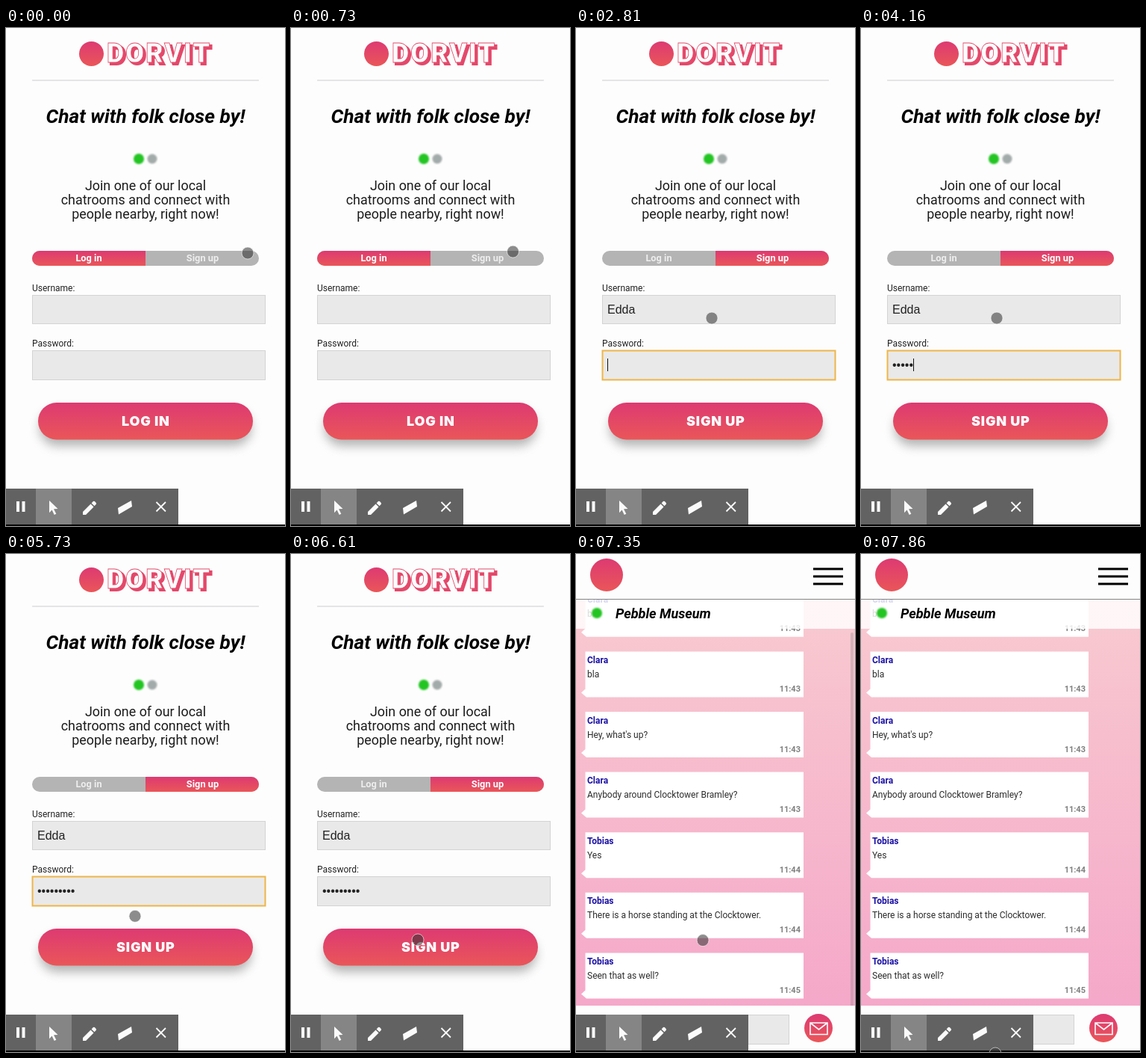
These frames come from a looping animation (374 px wide and 666 px high, 8000 ms). An HTML page:

```html
<!DOCTYPE html>
<html lang="en">
<head>
<meta charset="utf-8">
<title>Local chat</title>
<style>
html, body { margin: 0; height: 100%; overflow: hidden; background: #fdfdfd; }
svg { display: block; width: 100vw; height: 100vh; font-family: Roboto, sans-serif; }
.mid { text-anchor: middle; }
.title { font-weight: 700; font-style: italic; }
.logo { font-size: 36px; font-weight: 900; letter-spacing: 2px; }
.para { font-size: 17.9px; fill: #1c1c1c; }
.tab { font-size: 12.8px; font-weight: 700; }
.label { font-size: 12px; fill: #222; }
.typed { font: 16px "Liberation Sans", Arial, sans-serif; fill: #222; }
.button { font: 900 18px Inter, sans-serif; letter-spacing: .8px; fill: #fff; }
.field { fill: #e9e9e9; stroke: #d3d3d3; }
.name { font-size: 12px; font-weight: 700; fill: #1c12a4; }
.text { font-size: 12px; fill: #2c2c2c; }
.time { font-size: 11px; font-weight: 700; fill: #808080; text-anchor: end; }
</style>
</head>
<body>
<svg viewBox="0 0 374 666" preserveAspectRatio="none">
  <defs>
    <linearGradient id="red" x1="0" y1="0" x2="0" y2="1">
      <stop stop-color="#dd3a72"/><stop offset="1" stop-color="#ea5658"/>
    </linearGradient>
    <linearGradient id="sky" x1="0" y1="0" x2="0" y2="1">
      <stop stop-color="#f8cad0"/><stop offset="1" stop-color="#f5a8c9"/>
    </linearGradient>
    <filter id="soft"><feGaussianBlur stdDeviation="1.2"/></filter>
    <filter id="shade" x="-20%" y="-50%" width="140%" height="220%"><feGaussianBlur stdDeviation="7"/></filter>
    <clipPath id="pill"><rect x="35" y="298" width="304" height="20" rx="10"/></clipPath>
  </defs>
  <rect width="374" height="666" fill="#fdfdfd"/>

  <g id="login">
    <circle cx="114.5" cy="34.5" r="16.5" fill="url(#red)"/>
    <g class="logo">
      <text x="138" y="49" fill="#e4486a" stroke="#e4486a" stroke-width="2">DORVIT</text>
      <text x="135" y="46" fill="#fdfdfd" stroke="#e4486a" stroke-width=".8">DORVIT</text>
    </g>
    <path d="M35 70h304" stroke="#cdcdd2"/>
    <text class="title mid" x="187" y="127" font-size="26.3">Chat with folk close by!</text>
    <circle cx="178" cy="175" r="7" fill="#20c520" filter="url(#soft)"/>
    <circle cx="196" cy="175" r="6.5" fill="#a3aaaa" filter="url(#soft)"/>
    <g class="para mid">
      <text x="187" y="217">Join one of our local</text>
      <text x="187" y="236">chatrooms and connect with</text>
      <text x="187" y="255">people nearby, right now!</text>
    </g>
    <g clip-path="url(#pill)">
      <rect x="35" y="298" width="304" height="20" fill="#b4b4b4"/>
      <rect id="active" x="35" y="298" width="152" height="20" fill="url(#red)"/>
    </g>
    <rect id="ring" x="186.5" y="297.5" width="153" height="20.5" fill="none" stroke="#f3a437" stroke-width="1.3"/>
    <text id="tabIn" class="tab mid" x="111" y="312">Log in</text>
    <text id="tabUp" class="tab mid" x="263.5" y="312">Sign up</text>
    <text class="label" x="35" y="352">Username:</text>
    <rect id="userBox" class="field" x="35.5" y="357.5" width="312" height="38"/>
    <text id="user" class="typed" x="42" y="381.5"></text>
    <text class="label" x="35" y="426">Password:</text>
    <rect id="passBox" class="field" x="35.5" y="431.5" width="312" height="39"/>
    <text id="pass" class="typed" x="42" y="456"></text>
    <rect id="caret" width="1" height="17" fill="#111"/>
    <rect id="shadow" x="45" y="511" width="284" height="48" rx="24" fill="#777" filter="url(#shade)"/>
    <rect x="43" y="501" width="288" height="49.5" rx="24.75" fill="url(#red)"/>
    <text id="action" class="button mid" x="187.4" y="532"></text>
  </g>

  <g id="chat">
    <rect y="61" width="374" height="543" fill="url(#sky)"/>
    <g id="list"></g>
    <rect id="bar" x="368" y="105" width="4" height="550" rx="2" fill="#808080"/>
    <rect y="61" width="374" height="39" fill="#fff" opacity=".83"/>
    <circle cx="28" cy="79" r="7" fill="#20c520" filter="url(#soft)"/>
    <text class="title" x="53" y="86" font-size="18.1">Pebble Museum</text>
    <rect width="374" height="60" fill="#fdfdfd"/>
    <path d="M0 60.5h374" stroke="#858585"/>
    <circle cx="41" cy="28" r="22" fill="url(#red)"/>
    <path d="M318 20h40m-40 10h40m-40 10h40" stroke="#000" stroke-width="3"/>
    <rect y="604" width="374" height="62" fill="#fdfdfd"/>
    <rect class="field" x="12.5" y="616.5" width="273" height="39"/>
    <circle cx="325" cy="634" r="19" fill="url(#red)"/>
    <path d="M314 627h23v15.5h-23zl11.5 9 11.5-9" fill="none" stroke="#fff" stroke-width="1.6"/>
  </g>

  <path d="M0 665h374" stroke="#000" stroke-width="2"/>
  <rect y="616" width="231" height="48" fill="#626262"/>
  <rect x="40" y="616" width="48" height="48" fill="#858585"/>
  <g fill="#fbfbfb">
    <path d="M14 633h4v14h-4zm7.500 0h4v14h-4z"/>
    <path d="M58 632l11.500 11-5.500.3 3.300 6.400-2.600 1.300-3.100-6.500-3.600 3.700z"/>
    <path d="M103 651v-4l10.500-10.500 4 4L107 651zm11.600-15.600l2.300-2.300q1-.8 2 0l1.800 1.800q.8 1 0 2l-2.200 2.300z"/>
    <path d="M150 642l18-10 1 8-18 10.500z"/>
  </g>
  <path d="M201.500 634l12.500 12.500m0-12.500l-12.500 12.500" stroke="#fbfbfb" stroke-width="1.800"/>
  <circle id="pointer" r="8" fill="#303030" fill-opacity=".55" stroke="#fff" stroke-opacity=".6"/>
</svg>
<script>
const $ = id => document.getElementById(id);
const show = (id, on) => $(id).setAttribute('display', on ? 'inline' : 'none');
const set = (id, attrs) => { for (const k in attrs) $(id).setAttribute(k, attrs[k]); };
const clamp = v => Math.min(1, Math.max(0, v));

const LOOP = 8000, SWITCH = 1140, USER = 1800, PASS = 2810, PRESS = 6440, CHAT = 7040, LOADED = 7190;
const userKeys = [2080, 2290, 2400, 2530];
const passKeys = [3400, 3560, 3760, 3980, 4160, 4390, 4430, 4590, 4820];
const moves = [ // start, end, x, y
  [-1, 0, 324, 301],
  [80, 930, 296, 299],
  [1140, 1460, 182, 388],
  [5540, 5920, 170, 516],
  [7350, 7860, 180, 668]
];

const PITCH = 80.6;
const talk = [
  ['Clara', 'bla', '11:43'],
  ['Clara', 'bla', '11:43'],
  ['Clara', "Hey, what's up?", '11:43'],
  ['Clara', 'Anybody around Clocktower Bramley?', '11:43'],
  ['Tobias', 'Yes', '11:44'],
  ['Tobias', 'There is a horse standing at the Clocktower.', '11:44'],
  ['Tobias', 'Seen that as well?', '11:45']
];
$('list').innerHTML = talk.map(([name, text, time], i) => `
  <g transform="translate(0 ${49.8 + i * PITCH})">
    <path d="M12.5 0H305v61H14l-7-6 5.500-5z" fill="#fff"/>
    <text class="name" x="15" y="15.500">${name}</text>
    <text class="text" x="15" y="34.500">${text}</text>
    <text class="time" x="301" y="53.500">${time}</text>
  </g>`).join('');

const typed = (keys, t) => keys.filter(k => k <= t).length;

function focusBox(id, on) {
  $(id).style.stroke = on ? '#efb548' : '';
  $(id).style.strokeWidth = on ? 2 : 1;
}

function movePointer(t) {
  let x = 0, y = 0;
  for (const [start, end, toX, toY] of moves) {
    const k = clamp((t - start) / (end - start)), ease = k * (2 - k);
    x += (toX - x) * ease;
    y += (toY - y) * ease;
  }
  set('pointer', { cx: x, cy: y });
}

function drawLogin(t) {
  const up = t >= SWITCH;
  set('active', { x: up ? 187 : 35 });
  set('tabIn', { fill: up ? '#eee' : '#fff' });
  set('tabUp', { fill: up ? '#fff' : '#eee' });
  show('ring', up && t < USER);
  $('action').textContent = up ? 'SIGN UP' : 'LOG IN';

  const onUser = t >= USER && t < PASS;
  focusBox('userBox', onUser);
  focusBox('passBox', t >= PASS && t < PRESS);
  const letters = typed(userKeys, t), dots = typed(passKeys, t);
  $('user').textContent = 'Edda'.slice(0, letters);
  $('pass').textContent = '•'.repeat(dots);
  const blink = t >= PASS + 500 && t < passKeys[0];
  show('caret', t >= USER && t < 5160 && !blink);
  set('caret', onUser
    ? { x: 42 + (letters && $('user').getComputedTextLength()), y: 367 }
    : { x: 42 + 5.6 * dots, y: 442 });

  const press = Math.sin(Math.PI * clamp((t - PRESS) / 170));
  set('shadow', { y: 511 - 6 * press, opacity: .55 - .2 * press });
}

function drawChat(t) {
  show('list', t >= LOADED);
  set('bar', { opacity: .5 * (1 - clamp((t - LOADED) / 400)) });
}

function frame(now) {
  const t = now % LOOP, chat = t >= CHAT;
  show('login', !chat);
  show('chat', chat);
  (chat ? drawChat : drawLogin)(t);
  movePointer(t);
  requestAnimationFrame(frame);
}
frame(0);
</script>
</body>
</html>
```
